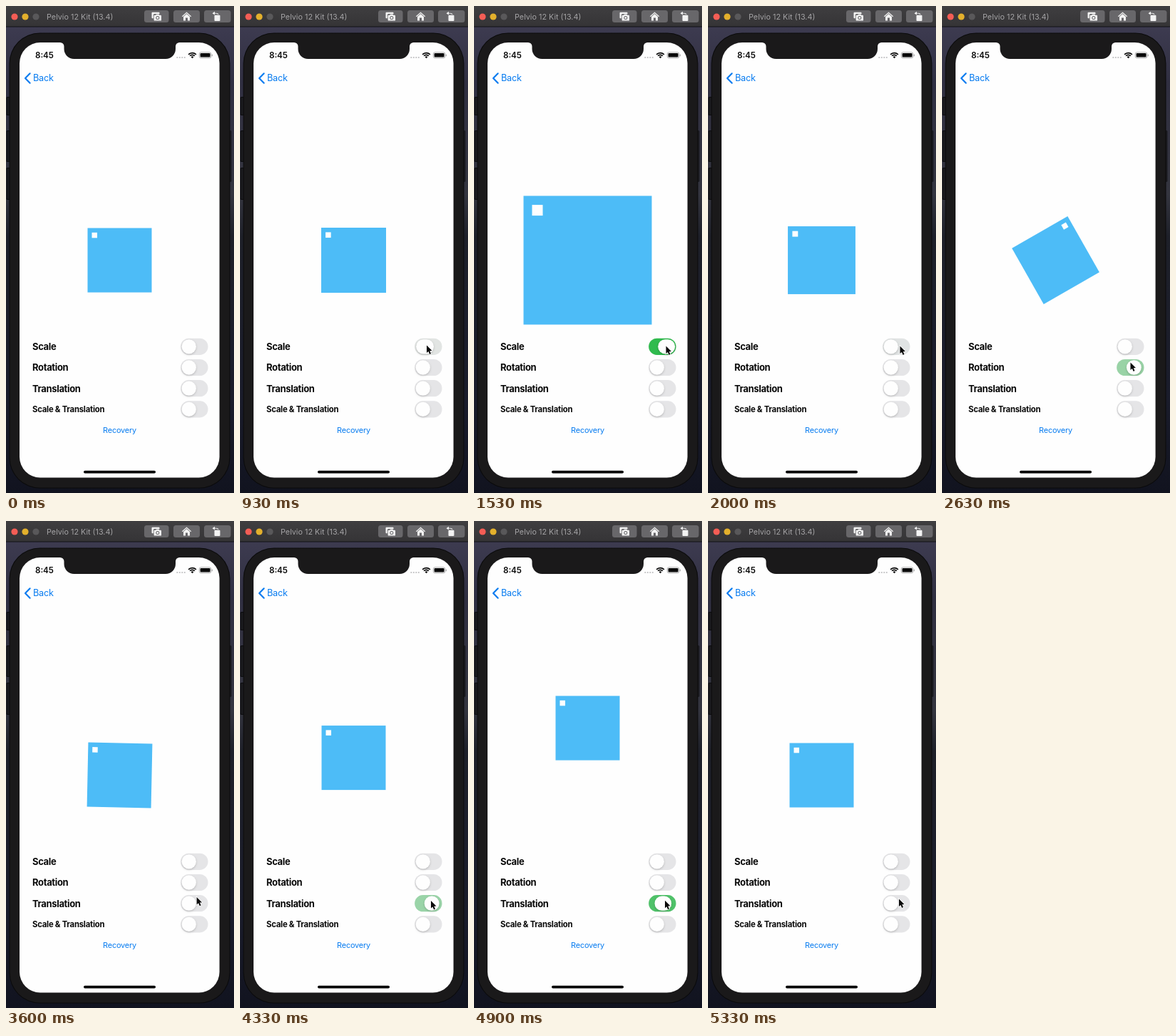
Write an HTML page with a canvas that moves like this. It is 320 px wide and 681 px high and loops after 5.36 s.

```html
<!DOCTYPE html>
<html lang="en">
<head>
<meta charset="utf-8">
<title>Transform demo</title>
<style>
html, body { margin: 0; width: 100%; height: 100%; overflow: hidden; background: #14151d; }
canvas { display: block; width: 320px; height: 681px; }
</style>
</head>
<body>
<canvas id="stage"></canvas>
<script>
const W = 320, H = 681, LOOP = 5360, MOVE = 500;
const FONT = 'Inter, Roboto, "Liberation Sans", sans-serif';
const BLUE = '#087cf0', BEZEL = '#1a191a', ICON = '#f3f3f3', BUTTON = '#68676a';
const canvas = document.getElementById('stage');
const c = canvas.getContext('2d');
const dpr = window.devicePixelRatio || 1;
canvas.width = W * dpr;
canvas.height = H * dpr;

// Each switch is turned on and off at these times.
const switches = [
  { label: 'Scale', y: 476.3, on: 893, off: 1583 },
  { label: 'Rotation', y: 505.5, on: 2430, off: 3130 },
  { label: 'Translation', y: 534.7, on: 4133, off: 4780 },
  { label: 'Scale & Translation', y: 563.9, on: Infinity, off: Infinity, small: true }
];

// Pointer path: time, x, y
const path = [
  [470, 326, 492], [800, 262, 474.5], [960, 262, 474.5], [1300, 269.5, 475.5],
  [2020, 269.5, 475.5], [2195, 264.5, 498.5], [3200, 264.5, 498.5],
  [3700, 268, 529], [3870, 268, 529], [4050, 268, 531],
  [4850, 268, 531], [5100, 268, 528.5]
];

const clamp = v => Math.max(0, Math.min(1, v));
const smooth = v => { v = clamp(v); return v * v * (3 - 2 * v); };
const mix = (a, b, k) => a + (b - a) * k;

// cubic-bezier(.42, 0, .58, 1)
function easeInOut(x) {
  if (x <= 0) return 0;
  if (x >= 1) return 1;
  let lo = 0, hi = 1, s;
  for (let i = 0; i < 24; i++) {
    s = (lo + hi) / 2;
    const bx = 3 * (1 - s) * (1 - s) * s * 0.42 + 3 * (1 - s) * s * s * 0.58 + s * s * s;
    if (bx < x) lo = s; else hi = s;
  }
  return s * s * (3 - 2 * s);
}

// 0..1 state of a switch for a given duration and easing
function level(sw, t, time, ease) {
  if (t < sw.on) return 0;
  return t < sw.off ? ease((t - sw.on) / time) : 1 - ease((t - sw.off) / time);
}

function box(x, y, w, h, r, fill) {
  c.beginPath();
  c.roundRect(x, y, w, h, r);
  c.fillStyle = fill;
  c.fill();
}

function dot(x, y, r, fill) {
  c.beginPath();
  c.arc(x, y, r, 0, Math.PI * 2);
  c.fillStyle = fill;
  c.fill();
}

function poly(points, fill) {
  c.beginPath();
  points.forEach(p => c.lineTo(p[0], p[1]));
  c.closePath();
  c.fillStyle = fill;
  c.fill();
}

function text(str, x, y, size, weight, fill, gap = 0, align = 'left') {
  c.font = `${weight} ${size}px ${FONT}`;
  c.letterSpacing = gap + 'px';
  c.textAlign = align;
  c.fillStyle = fill;
  c.fillText(str, x, y);
}

function desktop() {
  const g = c.createLinearGradient(0, 29, 0, H);
  g.addColorStop(0, '#3d3b50');
  g.addColorStop(0.12, '#302f41');
  g.addColorStop(0.36, '#34353f');
  g.addColorStop(0.45, '#1e2029');
  g.addColorStop(0.8, '#1a1c2b');
  g.addColorStop(1, '#11131f');
  c.fillStyle = g;
  c.fillRect(0, 0, W, H);
}

function titleBar() {
  const g = c.createLinearGradient(0, 0, 0, 29);
  g.addColorStop(0, '#3f3e40');
  g.addColorStop(1, '#353436');
  c.fillStyle = g;
  c.fillRect(0, 0, W, 29);
  c.fillStyle = '#111114';
  c.fillRect(0, 28.5, W, 1);
  dot(12, 15, 4.6, '#f45d55');
  dot(27, 15, 4.6, '#e3b02c');
  dot(42, 15, 4.6, '#59585a');
  text('Pelvio 12 Kit (13.4)', 57, 18.8, 10.8, 400, '#a3a2a4');
  [[194, 34.5], [235, 37], [278, 37.5]].forEach(b => box(b[0], 6, b[1], 17, 3.5, BUTTON));

  // screenshot
  box(204.5, 8.8, 11, 8.5, 1, ICON);
  box(206.8, 11, 11.7, 10, 1.5, BUTTON);
  box(207.6, 12.8, 10.4, 7.8, 1.2, ICON);
  box(210.6, 11.6, 4.4, 2.4, 0.6, ICON);
  dot(212.8, 16.6, 2.5, BUTTON);
  dot(212.8, 16.6, 1.5, ICON);

  // home
  poly([[253.5, 11], [258, 15], [258, 20.5], [255, 20.5], [255, 16.5], [252, 16.5], [252, 20.5], [249, 20.5], [249, 15]], ICON);
  c.strokeStyle = ICON;
  c.lineWidth = 1.2;
  c.beginPath();
  c.moveTo(247.3, 14.7);
  c.lineTo(253.5, 9.2);
  c.lineTo(259.7, 14.7);
  c.stroke();

  // rotate
  box(292.5, 12.8, 8, 8.2, 1, ICON);
  c.beginPath();
  c.moveTo(298, 11.6);
  c.quadraticCurveTo(297, 10, 292, 10);
  c.stroke();
  poly([[289.5, 10.3], [293, 7.8], [293, 12.6]], ICON);
}

function phone() {
  [[127, 26], [174, 44], [226, 45]].forEach(b => {
    box(0.5, b[0], 6, b[1], 1.5, '#0c0c0f');
    box(1.5, b[0] + 1, 4, b[1] - 2, 1, '#1b1b1f');
  });
  box(312, 174, 4.5, 72, 1.5, '#1b1b20');
  box(4.5, 37.5, 310, 637, 43, '#0a0a0b');
  box(5.5, 38.5, 308, 635, 42, BEZEL);
  box(19, 51, 280.6, 608.4, 29, '#fefefe');

  // notch
  c.beginPath();
  c.moveTo(76, 50);
  c.lineTo(76, 51);
  c.arcTo(81.5, 51, 81.5, 56.5, 5.5);
  c.arcTo(81.5, 74, 95.5, 74, 14);
  c.arcTo(238, 74, 238, 60, 14);
  c.arcTo(238, 51, 243.5, 51, 5.5);
  c.lineTo(243.5, 50);
  c.fillStyle = BEZEL;
  c.fill();

  text('8:45', 41, 73, 11.6, 600, '#0a0a0a');
  for (let i = 0; i < 4; i++) dot(240.3 + i * 3.5, 72, 1.1, '#bfbfc1');

  // wifi
  c.strokeStyle = '#0a0a0a';
  c.lineWidth = 1.7;
  [7.4, 4.7].forEach(r => {
    c.beginPath();
    c.arc(261.5, 73, r, -Math.PI * 0.76, -Math.PI * 0.24);
    c.stroke();
  });
  c.beginPath();
  c.moveTo(261.5, 73.2);
  c.arc(261.5, 73, 2.6, -Math.PI * 0.76, -Math.PI * 0.24);
  c.fillStyle = '#0a0a0a';
  c.fill();

  // battery
  c.beginPath();
  c.roundRect(271.3, 64.8, 16.6, 8, 2.3);
  c.lineWidth = 0.8;
  c.strokeStyle = '#9c9c9e';
  c.stroke();
  box(272.6, 66.1, 14, 5.4, 1.2, '#0a0a0a');
  box(288.7, 67.5, 1.1, 2.8, 0.5, '#9c9c9e');

  // navigation
  c.beginPath();
  c.moveTo(33.6, 94.3);
  c.lineTo(27, 101);
  c.lineTo(33.6, 107.7);
  c.lineWidth = 2.2;
  c.lineCap = 'round';
  c.lineJoin = 'round';
  c.strokeStyle = BLUE;
  c.stroke();
  c.lineCap = 'butt';
  c.lineJoin = 'miter';
  text('Back', 38, 105.4, 12.7, 400, BLUE, -0.25);
  text('Recovery', 159.5, 597, 10.9, 400, BLUE, -0.2, 'center');
  box(109, 649.7, 101, 3.7, 1.85, '#050505');
}

function toggle(sw, t) {
  if (sw.small) text(sw.label, 37, sw.y + 4.1, 11.3, 700, '#0a0a0a', -0.22);
  else text(sw.label, 37, sw.y + 4.8, 13, 700, '#0a0a0a', -0.35);

  const k = level(sw, t, 270, smooth);
  const tint = level(sw, t, 450, smooth);
  const press = at => smooth((t - at + 110) / 80) * (1 - smooth((t - at - 60) / 180));
  const wide = 20.3 + 4.5 * Math.max(press(sw.on), press(sw.off));
  const x = mix(246.6, 282.2 - wide, k);

  box(245.2, sw.y - 11.6, 38.3, 23.2, 11.6, '#e5e5e7');
  c.globalAlpha = tint;
  box(245.2, sw.y - 11.6, 38.3, 23.2, 11.6, '#30bb4e');
  c.globalAlpha = 1;
  c.save();
  c.shadowColor = 'rgba(0,0,0,.2)';
  c.shadowBlur = 3 * dpr;
  c.shadowOffsetY = 1.2 * dpr;
  box(x, sw.y - 10.15, wide, 20.3, 10.15, '#fefefe');
  c.restore();
}

function square(t) {
  const [scale, turn, shift] = switches.map(sw => level(sw, t, MOVE, easeInOut));
  c.save();
  c.translate(159.5, 355.5 - 75 * shift);
  c.rotate(Math.PI * turn);
  c.scale(1 + scale, 1 + scale);
  c.fillStyle = '#4dbcf7';
  c.fillRect(-45, -45, 90, 90);
  c.fillStyle = '#fefefe';
  c.fillRect(-39, -38.7, 7.5, 7.5);
  c.restore();
}

function pointer(t) {
  if (t < path[0][0]) return;
  let i = path.findIndex(p => p[0] > t);
  if (i < 0) i = path.length - 1;
  const a = path[i - 1], b = path[i];
  const k = smooth((t - a[0]) / (b[0] - a[0]));
  c.save();
  c.translate(mix(a[1], b[1], k), mix(a[2], b[2], k));
  c.lineWidth = 1.4;
  c.strokeStyle = '#fff';
  poly([[0, 0], [0, 10.6], [2.4, 8.4], [4.2, 12.4], [6, 11.6], [4.3, 7.7], [7.5, 7.5]], '#0a0a0a');
  c.stroke();
  c.fill();
  c.restore();
}

function draw(t) {
  c.setTransform(dpr, 0, 0, dpr, 0, 0);
  desktop();
  titleBar();
  phone();
  square(t);
  switches.forEach(sw => toggle(sw, t));
  pointer(t);
}

const start = performance.now();
function tick() {
  draw((performance.now() - start) % LOOP);
  requestAnimationFrame(tick);
}
tick();
</script>
</body>
</html>
```
